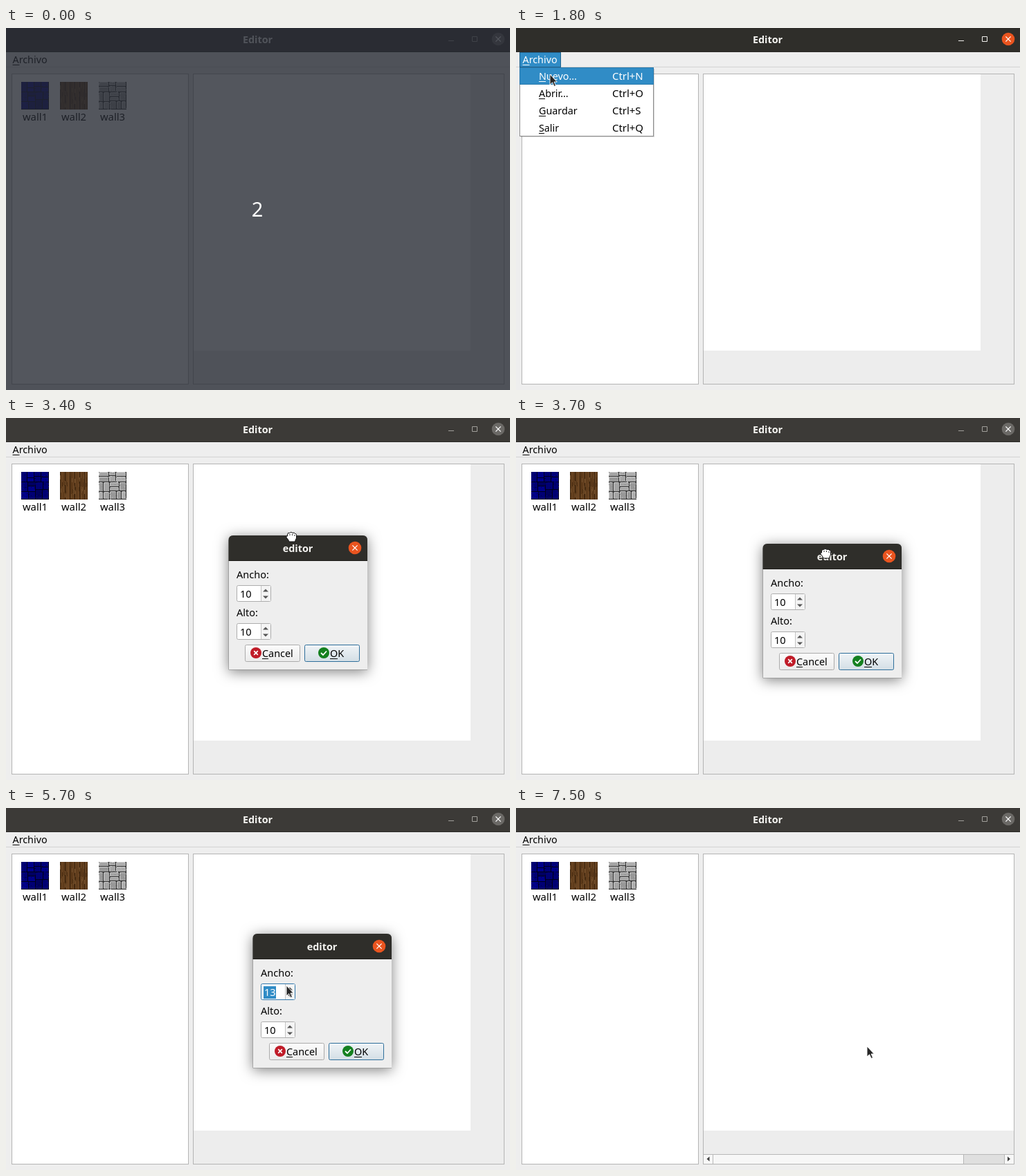
An HTML page for the animation above (8 s loop, 728x524 px).

```html
<!DOCTYPE html>
<html lang="es">
<head>
<meta charset="utf-8">
<title>Editor</title>
<style>
html, body { margin: 0; width: 728px; height: 524px; overflow: hidden; }
svg { display: block; }
text { font: 14.4px "Noto Sans", "Open Sans", sans-serif; white-space: pre; }
.bold { font-weight: 700; text-anchor: middle; fill: #f4f3f0; }
</style>
</head>
<body>
<svg id="stage" width="728" height="524" viewBox="0 0 728 524"></svg>
<script>
const LOOP = 8000;
const STEP = 100;
const BLUE = '#308cc6';

// ---- markup helpers ----
const rect = (x, y, w, h, fill, more = '') =>
  `<rect x="${x}" y="${y}" width="${w}" height="${h}" fill="${fill}" ${more}/>`;
const frameRect = (x, y, w, h, fill, stroke, more = '') =>
  rect(x + .5, y + .5, w - 1, h - 1, fill, `stroke="${stroke}" ${more}`);
const path = (d, fill, more = '') => `<path d="${d}" fill="${fill}" ${more}/>`;
const circle = (x, y, r, fill, more = '') =>
  `<circle cx="${x}" cy="${y}" r="${r}" fill="${fill}" ${more}/>`;
const text = (x, y, s, size = 14.4, more = '') =>
  `<text x="${x}" y="${y}" style="font-size:${size}px" ${more}>${s}</text>`;
// label with its first letter underlined
const mnemonic = (x, y, s, w, size, fill = '#000') =>
  text(x, y, s, size, `fill="${fill}"`) + rect(x, y + 2, w, 1, fill);
const group = (id, body) => `<g id="${id}">${body}</g>`;
const cross = (x, y, r, width = 1.3) =>
  path(`M${x - r} ${y - r}l${2 * r} ${2 * r}m0 ${-2 * r}l${-2 * r} ${2 * r}`,
    'none', `stroke="#fff" stroke-width="${width}"`);
const gradient = (id, top, bottom) =>
  `<linearGradient id="${id}" x2="0" y2="1"><stop stop-color="${top}"/>` +
  `<stop offset="1" stop-color="${bottom}"/></linearGradient>`;

// ---- 40 x 40 wall tiles ----
function random(seed) {
  return () => (seed = (seed * 16807) % 2147483647) / 2147483647;
}
const pick = (rnd, list) => list[Math.floor(rnd() * list.length)];

// cuts an area into uneven blocks and draws each one
function blocks(x, y, w, h, rnd, drawBlock) {
  if (w * h < 150) return drawBlock(x, y, w, h);
  const cut = .38 + .24 * rnd();
  if (w > h * 1.1) {
    const a = Math.round(w * cut);
    return blocks(x, y, a, h, rnd, drawBlock) + blocks(x + a, y, w - a, h, rnd, drawBlock);
  }
  const a = Math.round(h * cut);
  return blocks(x, y, w, a, rnd, drawBlock) + blocks(x, y + a, w, h - a, rnd, drawBlock);
}

function specks(count, rnd, colors, length = 1) {
  let out = '';
  for (let i = 0; i < count; i++)
    out += rect(Math.floor(rnd() * 40), Math.floor(rnd() * (41 - length)), 1, length, pick(rnd, colors));
  return out;
}

function blueWall() {
  const rnd = random(11);
  const brick = (x, y, w, h) => rect(x, y, w - 1, h - 1, pick(rnd, ['#000074', '#000088', '#00005e']));
  return rect(0, 0, 40, 40, '#00001c') + blocks(0, 0, 40, 40, rnd, brick) +
    specks(90, rnd, ['#000034', '#00004c', '#00009c']);
}

function woodWall() {
  const rnd = random(5);
  let out = '';
  for (let x = 0; x < 40; x++)
    out += rect(x, 0, 1, 40, x % 7 ? pick(rnd, ['#5a3818', '#64401f', '#6b4623']) : '#3a230e');
  return out + specks(40, rnd, ['#4a2d11', '#74502c'], 6);
}

function stoneWall() {
  const rnd = random(23);
  const stone = (x, y, w, h) =>
    rect(x, y, w - 1, h - 1, '#d0d0d0', 'rx="1.5"') +
    rect(x + 1, y + 1, w - 2, h - 2, pick(rnd, ['#999', '#a4a4a4', '#adadad']), 'rx="1"');
  return rect(0, 0, 40, 40, '#303030') + blocks(0, 0, 40, 40, rnd, stone) +
    specks(60, rnd, ['#868686', '#bcbcbc']);
}

const tiles = [blueWall, woodWall, stoneWall].map((art, i) =>
  `<g transform="translate(${22 + 56 * i} 78)">${art()}</g>` +
  text(42 + 56 * i, 134, 'wall' + (i + 1), 14.8, 'text-anchor="middle"')).join('');

// ---- main window ----
const mainWindow =
  rect(0, 0, 728, 524, '#eeeeee') +
  rect(0, 0, 728, 35, '#3c3a37', 'id="bar"') +
  rect(0, 34, 728, 1, '#2b2a27') +
  text(363.5, 22, 'Editor', 14.4, 'class="bold"') +
  group('winButtons', path('M639 18.5h8M673.5 12.5h7v7h-7z', 'none')) +
  circle(711, 16, 9.3, '#6b6966', 'id="winClose"') + cross(711, 16, 3.6) +
  mnemonic(9.5, 51, 'Archivo', 10, 14.3) +
  rect(0, 56, 728, 1, '#d3d3d3') +
  frameRect(8, 66, 256, 450, '#fff', '#b4b4b4') +
  tiles +
  frameRect(270, 66, 450, 450, '#ededed', '#b4b4b4') +
  rect(271, 67, 400, 400, '#fff', 'id="map"') +
  group('scroll',
    rect(271, 501, 448, 14, '#f7f7f7') +
    rect(647, 502, 58, 13, '#dfdfdf') +
    path('M271 501.5h448M284.5 501v14M646.5 501v14M705.5 501v14', 'none', 'stroke="#b8b8b8"') +
    path('M279.5 504.5v7l-4-3.5zM710 504.5v7l4-3.5z', '#404040'));

// ---- file menu ----
const rows = [
  ['Nuevo...', 'N', 10], ['Abrir...', 'O', 9], ['Guardar', 'S', 10], ['Salir', 'Q', 8]
];
const menuRow = ([name, key, w], i, fill = '#000') =>
  mnemonic(33, 75 + i * 25, name, w, 14.3, fill) +
  text(139, 75 + i * 25, 'Ctrl+' + key, 14.9, `fill="${fill}"`);
const menu =
  frameRect(5, 35, 60, 22, BLUE, '#22628b') +
  mnemonic(9.5, 51, 'Archivo', 10, 14.3, '#fff') +
  rect(7, 59, 193, 99, '#000', 'opacity=".16"') +
  frameRect(5, 57, 194, 100, '#fff', '#8e8e8e') +
  rows.map((r, i) => menuRow(r, i)).join('') +
  group('menuHot', frameRect(5, 57, 194, 25, BLUE, '#2a7aad') + menuRow(rows[0], 0, '#fff'));

// ---- size dialog, origin at its top left corner ----
const spin = (id, label, y) =>
  text(12, y - 10, label, 14.5) +
  frameRect(12, y, 50, 24, '#fff', '#adadad', `rx="2" id="${id}Box"`) +
  rect(48, y + 1, 13, 22, '#f4f4f4') +
  rect(47, y + 1, 1, 22, '#c4c4c4') +
  path(`M50 ${y + 9.5}h8l-4 -4zM50 ${y + 15.5}h8l-4 4z`, '#555') +
  rect(16, y + 4, 18, 18, BLUE, `id="${id}Mark" visibility="hidden"`) +
  text(17, y + 18, '10', 14.6, `id="${id}"`);
const button = (id, x, pad, label, w, iconFill, mark, fill, stroke) =>
  frameRect(x, 159, 80, 25, fill, stroke, `rx="2" id="${id}"`) +
  circle(x + pad, 171, 8, iconFill) + mark +
  mnemonic(x + pad + 9, 177, label, w, 14.4);
const outline = 'M.5 195.5V8Q.5 1 7.5 1H194Q201 1 201 8V195.5Z';
const dialog =
  path(outline, '#777', 'filter="url(#shadow)"') +
  rect(1, 37, 200, 158, '#eeeeee') +
  path('M.5 38V8Q.5 1 7.5 1H194Q201 1 201 8V38Z', '#2f2e2a') +
  rect(1, 37, 200, 1, '#1d1c19') +
  text(100.5, 25, 'editor', 14.4, 'class="bold"') +
  circle(183, 19, 9.3, '#e9541f') + cross(183, 19, 3.6) +
  spin('wide', 'Ancho:', 73) + spin('high', 'Alto:', 128) +
  button('cancel', 24, 16, 'Cancel', 9, '#c01c28', cross(40, 171, 2.8, 1.7), 'url(#plain)', '#ababab') +
  button('ok', 110, 28, 'OK', 11, '#14801f',
    path('M134 171l3 3l5 -5.5', 'none', 'stroke="#fff" stroke-width="1.8"'),
    'url(#tint)', '#2f6f9b');

// ---- pointers ----
const arrow =
  path('M0 0V15L3.6 11.8L6.1 17.5L8.5 16.4L6 11H10.3Z', '#262626', 'stroke="#fff" stroke-width=".9"');
const hand = path(
  'M-5.5 -3Q-5 -7 -2.5 -5.5Q0 -8 2 -5.5Q4.5 -7 5.5 -4.5Q8 -5 7.5 -1V2Q6 4 5.5 7H-3Q-4 4 -7 1Q-8 -2 -5.5 -1Z',
  '#fff', 'stroke="#111"') +
  path('M-2 -4v2M1.5 -4v2M5 -3v2', 'none', 'stroke="#111" stroke-width=".9"');

const stage = document.getElementById('stage');
stage.innerHTML =
  '<defs><filter id="shadow" x="-30%" y="-30%" width="160%" height="160%">' +
  '<feDropShadow dx="0" dy="3" stdDeviation="9.5" flood-opacity=".5"/></filter>' +
  gradient('plain', '#fcfcfc', '#ebebeb') + gradient('tint', '#f0f4f7', '#d3dee5') +
  gradient('hot', '#f8fbfd', '#e2edf3') + '</defs>' +
  mainWindow + group('menu', menu) + group('dialog', dialog) +
  group('arrow', arrow) + group('hand', hand) +
  group('count', rect(0, 0, 728, 524, '#252932', 'opacity=".79"') +
    text(363, 273, '2', 29, 'text-anchor="middle" fill="#fff"'));

const el = {};
stage.querySelectorAll('[id]').forEach(n => el[n.id] = n);

// ---- motion: [start, duration, x, y], each move begins where the last ended ----
const pointerMoves = [
  [700, 0, 54, 17], [700, 200, 45, 44],
  [1500, 300, 49, 67],
  [2500, 100, 41, 77], [2600, 100, 37, 64],
  [3100, 100, 91, 22], [3200, 200, 412, 172], [3400, 100, 461, 212], [3500, 200, 447, 196],
  [3800, 200, 488, 215], [4000, 100, 438, 275],
  [4200, 300, 399, 257], [4500, 200, 405, 257],
  [5700, 300, 508, 339], [6800, 200, 507, 345]
];
const dialogMoves = [
  [2200, 0, 0, 4], [3200, 200, 321, 169], [3400, 100, 370, 197], [3500, 200, 356, 181]
];
const clicks = [5000, 5500, 5700];

function follow(moves, t) {
  let [, , x, y] = moves[0];
  for (const [start, time, toX, toY] of moves) {
    if (t < start) break;
    const u = time ? Math.min(1, (t - start) / time) : 1;
    x += (toX - x) * u;
    y += (toY - y) * u;
  }
  return `translate(${Math.round(x)} ${Math.round(y)})`;
}

const show = (node, on) => node.setAttribute('visibility', on ? 'visible' : 'hidden');
const within = (t, a, b) => t >= a && t < b;

function draw(time) {
  const t = Math.floor(time / STEP) * STEP;
  const menuOpen = within(t, 1300, 2200);
  const dialogOpen = within(t, 2200, 7400);
  const dragging = within(t, 3200, 3900);
  const stepped = dialogOpen && t >= clicks[0];
  const resized = t >= 7500;
  const spot = follow(pointerMoves, t);

  show(el.count, t < 100);
  el.bar.setAttribute('fill', menuOpen ? '#2f2e2a' : '#3c3a37');
  el.winClose.setAttribute('fill', menuOpen ? '#e9541f' : '#6b6966');
  el.winButtons.setAttribute('stroke', menuOpen ? '#f2f1ee' : '#a19f9b');

  show(el.menu, menuOpen);
  show(el.menuHot, menuOpen && t >= 1700);

  show(el.dialog, dialogOpen);
  el.dialog.setAttribute('transform', follow(dialogMoves, t));
  el.wide.textContent = 10 + clicks.filter(c => c <= t).length;
  el.wide.setAttribute('fill', stepped ? '#fff' : '#000');
  show(el.wideMark, stepped);
  el.wideBox.setAttribute('stroke', t >= 4300 ? '#2f76ab' : '#adadad');
  el.ok.setAttribute('fill', t >= 6900 ? 'url(#hot)' : 'url(#tint)');

  el.map.setAttribute('width', resized ? 448 : 400);
  show(el.scroll, resized);

  show(el.arrow, t >= 700 && !dragging);
  show(el.hand, dragging);
  el.arrow.setAttribute('transform', spot);
  el.hand.setAttribute('transform', spot);
}

const start = performance.now();
function tick() {
  draw((performance.now() - start) % LOOP);
  requestAnimationFrame(tick);
}
tick();
</script>
</body>
</html>
```
